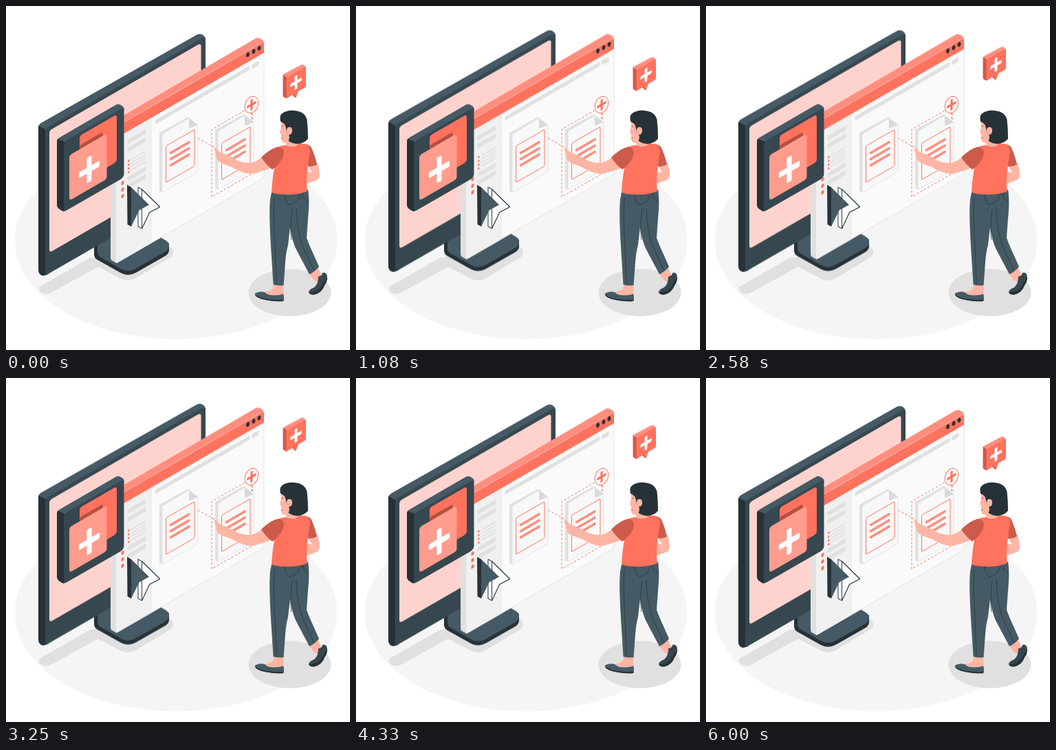
An HTML page for the animation above (6.04 s loop, 500 by 500 pixels).

```html
<!DOCTYPE html>
<html lang="en">
<head>
<meta charset="utf-8">
<title>Isometric desktop</title>
<style>
html, body { margin: 0; width: 100%; height: 100%; overflow: hidden; background: #fff; }
svg { display: block; width: 100%; height: 100%; }

/* 24 steps a second: 6 s of motion, then one step of rest */
.bob, .rise { animation: bob 6040ms -5ms infinite; }
.bob { animation-timing-function: steps(18); }
.rise { animation-name: rise; animation-timing-function: steps(72); }
@keyframes bob {
  0%, 24.834%, 49.669%, 74.503%, 99.338%, 100% { transform: translateY(0); }
  12.417%, 37.252%, 62.086%, 86.921% { transform: translateY(-10px); }
}
@keyframes rise {
  0%, 99.338%, 100% { transform: translateY(0); }
  49.669% { transform: translateY(-30px); }
}

.ink { fill: #263238; }
.slate { fill: #37474f; }
.steel { fill: #455a64; }
.red { fill: #ff725e; }
.coral { fill: #ff8e7e; }
.brick { fill: #cc5b4b; }
.skin { fill: #ffb5a3; }
.grey { fill: #e0e0e0; }
.pale { fill: #f5f5f5; }
.line { fill: none; stroke: #ff725e; stroke-width: 1; }
.dash { stroke-dasharray: 3.2 2.8; }
.seam { fill: none; stroke: #263238; stroke-width: .7; }
.edge { fill: #fff; stroke: #37474f; stroke-width: 1.1; stroke-linejoin: round; }
</style>
</head>
<body>
<svg viewBox="0 0 500 500">
  <defs>
    <g id="doc">
      <path class="grey" d="M223 186Q223 184 225 183L264 161.500L268 163L227 187V271L224 269.500Q223 269 223 267Z"/>
      <path d="M227 188.500Q227 186 229 185L266 163L279 173V239.500Q279 241 277 242L229 270Q227 271 227 269Z" fill="#f8f8f8" stroke="#e0e0e0" stroke-width=".8"/>
      <path d="M266 163V176.500Q266 178 267.500 177.500L279 173Z" fill="#d9d9d9"/>
      <rect class="line" width="41.500" height="53" rx="2" transform="matrix(1 -.577 0 1 232.500 203.500)"/>
      <path d="M239.500 213.500L266 198M239.500 222.500L266 207M239.500 231.500L266 216" fill="none" stroke="#ff8e7e" stroke-width="3.600" stroke-linecap="round"/>
    </g>
    <path id="plus" d="M-2.100 -8Q-2.100 -9 -1.100 -9H1.100Q2.100 -9 2.100 -8V-2.100H8Q9 -2.100 9 -1.100V1.100Q9 2.100 8 2.100H2.100V8Q2.100 9 1.100 9H-1.100Q-2.100 9 -2.100 8V2.100H-8Q-9 2.100 -9 1.100V-1.100Q-9 -2.100 -8 -2.100H-2.100Z"/>
  </defs>

  <!-- floor and shadows -->
  <ellipse class="pale" cx="247" cy="341" rx="234.500" ry="143.500"/>
  <path class="grey" d="M48 411Q48 408 52 406L122 366L235 348Q243 351 243 359Q243 363 238 366L188 396Q177 402 166 396L134 379L65 417Q59 420 52 417Q48 415 48 411Z"/>
  <ellipse class="grey" cx="412.500" cy="416.500" rx="60" ry="34.500"/>

  <g class="bob">
    <!-- stand -->
    <path class="ink" d="M128 335V361Q128 366 133 369L166 387.500Q177 394 189 387.500L232 363Q237 360 237 354V345L200 325Z"/>
    <path class="steel" d="M133 335V357Q133 362 137 365L167 382Q177 388 188 382L232 357Q237 353.500 237 348Q237 343 231 340L205 325Z"/>

    <!-- monitor -->
    <path class="steel" d="M47 177Q47 172.500 51 170L277 42Q282 39.500 286 42Q290 44.500 290 49V90L57 215Z"/>
    <path class="ink" d="M47.500 174L57 179L62 190V389.500Q54 393.500 51 391Q47 388.500 47 384V177Q47 175 47.500 174Z"/>
    <g transform="matrix(1 -.577 0 1 57 178.500)">
      <rect class="slate" width="233" height="213.500" rx="5"/>
      <rect x="6" y="6" width="220.500" height="177.500" rx="4" fill="#ffd3cd"/>
    </g>

    <!-- browser window -->
    <path class="grey" d="M152 172L161 175V374L154 370Q152 369 152 366Z"/>
    <path class="coral" d="M152 170L363 47Q366 45.500 369 47L373 49.500Q375 51 375 54L160 178Z"/>
    <g transform="matrix(1 -.577 0 1 160 176)">
      <rect width="215" height="198" rx="3" fill="#fafafa" stroke="#dedede" stroke-width=".8"/>
      <rect y="16" width="51" height="182" rx="2" fill="#f0f0f0"/>
      <path d="M51 16V198" stroke="#e4e4e4" stroke-width=".8"/>
      <path class="red" d="M0 0H212Q215 0 215 3V16H0Z"/>
      <g class="grey">
        <rect x="56.500" y="22.800" width="138" height="6" rx="2"/>
        <rect x="197" y="23" width="10.500" height="6.500" rx="2"/>
        <rect x="16.500" y="28" width="26.500" height="6.500" rx="1"/>
        <rect x="16.500" y="39.500" width="26.500" height="6.500" rx="1"/>
        <rect x="16.500" y="82" width="26.500" height="6.500" rx="1"/>
        <rect x="16.500" y="93" width="26.500" height="6.500" rx="1"/>
      </g>
      <path d="M22 60H43M22 65H43M22 70H43M22 75H43" stroke="#dcdcdc" stroke-width="1.600"/>
      <path d="M17 59.500H19.500M17 65H19.500M17 70.500H19.500M17 76H19.500" stroke="#ff725e" stroke-width="2.400"/>
      <g class="red">
        <rect x="7.500" y="84" width="4" height="5.500" rx="1.500"/>
        <rect x="7.500" y="93.500" width="4" height="5.500" rx="1.500"/>
        <rect x="7.500" y="103" width="4" height="5.500" rx="1.500"/>
      </g>
    </g>
    <g class="ink">
      <ellipse cx="351.500" cy="70.700" rx="2.300" ry="3.500" transform="rotate(18 351.500 70.700)"/>
      <ellipse cx="360" cy="66" rx="2.300" ry="3.500" transform="rotate(18 360 66)"/>
      <ellipse cx="368" cy="61.300" rx="2.300" ry="3.500" transform="rotate(18 368 61.300)"/>
    </g>
  </g>

  <!-- documents -->
  <path class="line dash" d="M299 277.500V179.500L357 146V244Z"/>
  <use href="#doc"/>
  <use href="#doc" x="81" y="-4"/>
  <path class="line dash" d="M279 192L306 207M358 156V167"/>
  <ellipse cx="357" cy="143.500" rx="9.200" ry="12.500" transform="rotate(22 357 143.500)" fill="#fff" stroke="#ff725e"/>
  <use href="#plus" class="red" transform="matrix(.76 -.438 0 .88 357 143.500)"/>

  <!-- cursor -->
  <path class="edge" d="M192 263.500L197.500 266.500L223.500 292L208.500 300L197.500 323.500L192 320.500Z"/>
  <path class="edge" d="M197.500 266.500L223.500 292L208.500 300L197.500 323.500Z"/>
  <path class="steel" d="M181.500 263L208 289L193.500 297L182 320.500Z"/>
  <path class="ink" d="M176 260L182 263.500V320.500L176.500 317.500Z"/>

  <!-- app icon -->
  <path class="steel" d="M74 197Q74 193 78 191L160 143.500Q163 142 166 143.500L170 146Q172 148 172 151L84 210Z"/>
  <path class="ink" d="M75 193L84.500 197L89 210V296Q84 300 81 297.500L78 295.500Q74 293 74 289V197Z"/>
  <g transform="matrix(1 -.577 0 1 84 197.500)">
    <rect class="slate" width="87.500" height="102" rx="5"/>
  </g>
  <g transform="matrix(1 -.577 0 1 107 188.500)">
    <rect class="red" width="54" height="69" rx="4"/>
    <rect y="14" width="33.500" height="20" rx="3" fill="#b35042"/>
  </g>
  <g transform="matrix(1 -.577 0 1 92 217)">
    <rect width="54.500" height="66" rx="4" fill="#ff9c8e"/>
  </g>
  <use href="#plus" fill="#fff" transform="matrix(1.680 -.969 0 2.050 121 237.500)"/>

  <!-- speech bubble -->
  <g class="rise">
    <path class="coral" d="M402.500 101Q402.500 99.500 404.500 98.500L429 85.500Q431 84.500 432.500 85.500L436 88.500L408 106Z"/>
    <path class="brick" d="M402.500 100L408 103.500V134.500L404 132.500Q402.500 131.500 402.500 130ZM415 128L420.500 133.500L424 124L416 126Z"/>
    <path class="red" d="M407.500 105.500Q407.500 104 409 103L434 88.700Q436 87.700 436 90V115.500Q436 117.500 434.500 118.500L425 123.800L421.300 134L418 127.800L409.500 133.500Q407.500 135 407.500 132.500Z"/>
    <use href="#plus" fill="#fff" transform="matrix(.92 -.531 0 1.100 421.500 111)"/>
  </g>

  <!-- woman: feet and legs -->
  <path class="skin" d="M389 403H403.500V421Q390 425 376 416Q387 414 389 408ZM440 388L453 379L458 390L454 402L447 398Z"/>
  <path class="steel" d="M363 417Q370 414 376 416Q381 421 391 420.500Q398 420.500 403 418.500Q405 424 403 429Q393 430 382 428Q367 426 362.500 421Q361 418 363 417Z"/>
  <path class="ink" d="M362.500 420Q373 426 386 426.500Q396 428 404 426.500L403 429Q393 430 382 428Q367 426 362.500 421Z"/>
  <path class="slate" d="M454 393Q459 393 460 388Q464 386 466.500 391Q468 399 463 406Q459 417 448 419.500Q441 420 440 415Q442 411 448 409Q454 404 454 393Z"/>
  <path class="ink" d="M467 394Q467 401 463 406Q459 417 448 419.500Q441 420 440 416Q452 417 458 408Q462 402 467 394Z"/>
  <path class="steel" d="M405 271L439 267Q441 279 440 296Q438 321 437 337Q440 346 447 361L455 379Q448 387 441 390L423 356Q414 340 411 305Z"/>
  <path class="steel" d="M386 271L433 271Q432 286 415 298Q413 323 410 347Q407 358 406 372L403.500 406Q395 407 388.500 405L385 350Q382 300 384 281Z"/>
  <path class="seam" d="M405 274Q406 287 412 289Q424 287 428 273M431 271Q432 282 439 283M416 295Q412 325 415 340M390 278Q388 310 391 347L393 404M422 294Q423 327 431 349L448 385"/>

  <!-- arms, torso -->
  <path class="skin" d="M438 231L453 228Q456 238 456 247Q455 252 449 254L438 258Q434 255 434 249Q434 243 438 241L445 242Z"/>
  <path class="brick" d="M434 201Q441 201 444 206Q449 217 452 230Q446 234 438 233L432 215Z"/>
  <path class="skin" d="M373 219Q366 225 357 228Q342 229 330 221Q322 216 315 214Q308 211 304 206Q302 207 304 212L306 220Q307 226 314 229L328 234Q344 244 359 244Q377 239 389 234Z"/>
  <path class="red" d="M392 206Q399 203 407 202Q415 200 434 200Q442 202 442 212Q439 227 438 240Q436 255 438 269Q426 275 406 274Q393 274 386 271Q387 251 390 236L386 218Z"/>
  <path class="brick" d="M371 220Q383 208 394 205Q402 204 404 211Q404 220 398 227Q393 234 387 237.500Q378 231 371 220Z"/>
  <path class="skin" d="M406 190H425V201Q419 207 407 203Z"/>

  <!-- head -->
  <path class="skin" d="M401 165Q399 172 400 176L398 183Q398 185 400 186Q400 195 402 198Q406 200 412 197L420 185L415 164Z"/>
  <path class="ink" d="M399 168Q397 160 401 156.500Q408 151 419 152Q434 153 437.500 165Q439 178 439 193Q433 200 424 200.500Q416 200 410.500 196Q413 191 411 187Q408 185 407 178Q406 170 399 168Z"/>
  <path class="skin" d="M408 181Q408 176 412 176Q416 176 416 181Q416 187 411 187Q408 186 408 181Z"/>
  <path class="brick" d="M400 175L403.500 173.500V174.500L400.500 176ZM400 191L403 191.500L400.500 193Z"/>
</svg>
</body>
</html>
```
